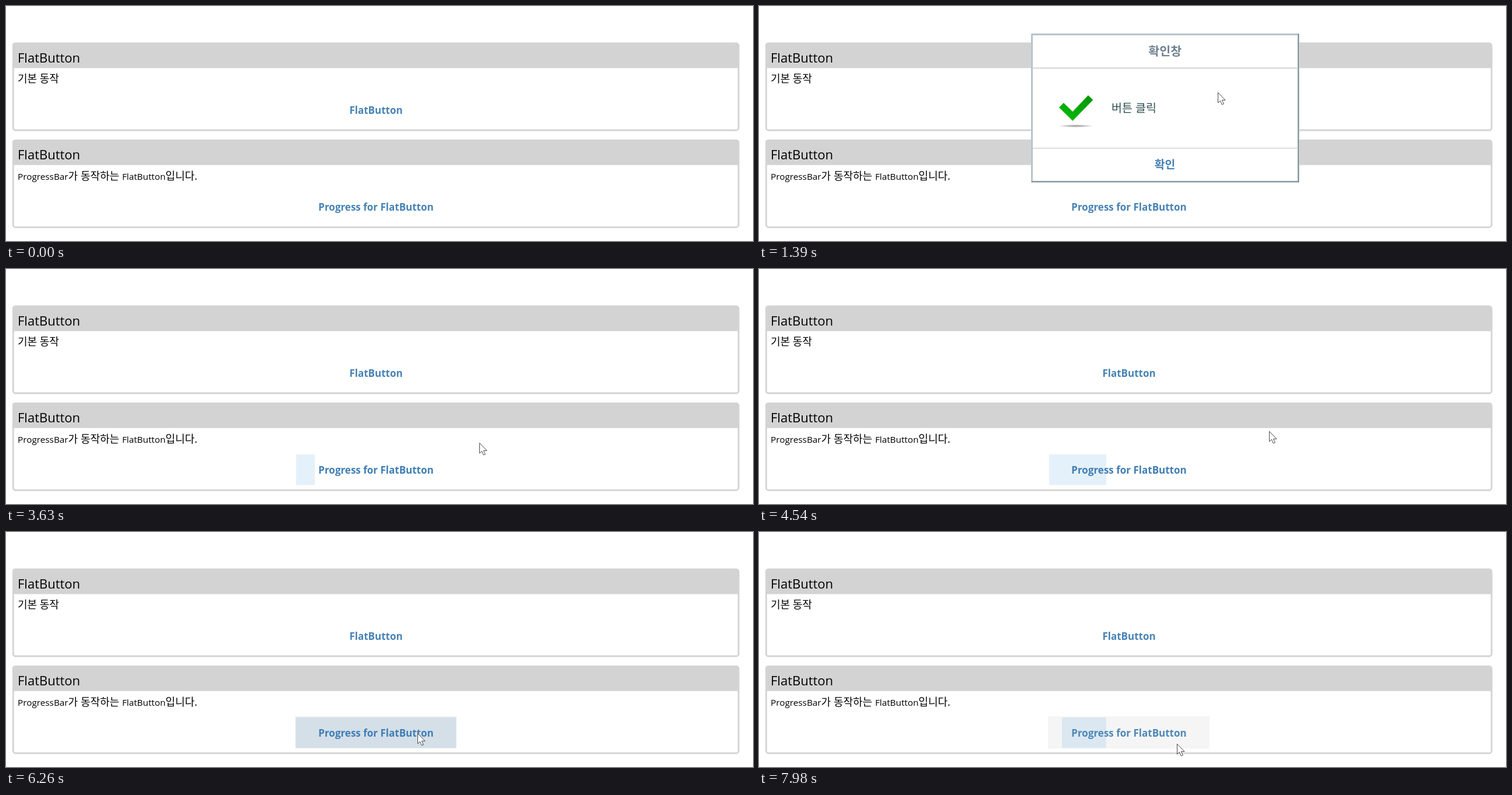
These frames come from a looping animation (1280 by 403 pixels, 8000 ms). An HTML page:

```html
<!DOCTYPE html>
<html lang="ko">
<head>
<meta charset="utf-8">
<title>FlatButton</title>
<style>
  html, body { margin: 0; width: 100%; height: 100%; overflow: hidden; background: #fff; }
  svg { display: block; width: 100%; height: 100%; }
  text { font-family: "Open Sans", "Noto Sans CJK KR", "Noto Sans CJK", sans-serif; white-space: pre; }
  .head { font-size: 22px; }
  .latin { font-size: 15.3px; word-spacing: .8px; }
  .hangul { font-size: 18px; }
  .label { font-size: 17px; font-weight: 700; fill: #4682b4; text-anchor: middle; }
  .title { font-size: 20.6px; font-weight: 700; fill: #708090; text-anchor: middle; }
  .message { font-size: 19.5px; fill: #2f4f4f; }
  .ok { font-size: 19.3px; font-weight: 700; fill: #4682b4; text-anchor: middle; }
  .hover { fill: #f5f5f5; }
</style>
</head>
<body>
<svg viewBox="0 0 1280 403" xmlns="http://www.w3.org/2000/svg">
  <defs>
    <linearGradient id="green" x1="0" y1="1" x2="1" y2="0">
      <stop offset="0" stop-color="#06bd06"/><stop offset="1" stop-color="#079407"/>
    </linearGradient>
    <radialGradient id="shade">
      <stop offset="0" stop-color="#999"/><stop offset=".5" stop-color="#c4c4c4"/>
      <stop offset="1" stop-color="#fff"/>
    </radialGradient>
    <g id="panel">
      <rect x="12.3" y="64" width="1243" height="149" rx="4" fill="#fff" stroke="#d3d3d3" stroke-width="2.8"/>
      <path d="M11 106.5V68q0-5 5-5H1251q5 0 5 5V106.5Z" fill="#d3d3d3"/>
      <text class="head" x="20" y="97">FlatButton</text>
    </g>
  </defs>

  <use href="#panel"/>
  <text class="hangul" x="20" y="131">기본 동작</text>
  <rect id="hover1" class="hover" x="495" y="150" width="277" height="55.5"/>
  <text class="label" x="634" y="185">FlatButton</text>

  <use href="#panel" y="166.3"/>
  <text class="latin" x="20" y="298">ProgressBar<tspan class="hangul">가</tspan> <tspan class="hangul">동작하는</tspan> FlatButton<tspan class="hangul">입니다.</tspan></text>
  <rect id="hover2" class="hover" x="495" y="316" width="277" height="55.5"/>
  <rect id="press" x="496.5" y="317.5" width="275" height="53" fill="#d5dfe8" stroke="#e6ebf0"/>
  <rect id="bar" y="318" height="52.5" fill="rgba(47,138,213,.12)"/>
  <text id="label2" class="label" x="634" y="351">Progress for FlatButton</text>

  <g id="dialog">
    <rect id="glow" x="466.5" y="47.5" width="459" height="255" fill="none" stroke="#cfdfea"/>
    <rect x="467" y="48" width="458" height="254" fill="#fff"/>
    <rect x="468.7" y="49.7" width="454" height="250.5" fill="none" stroke="#d3d3d3" stroke-width="1.4"/>
    <rect id="okHover" x="469" y="244" width="454" height="56" fill="#ebebeb"/>
    <path id="lightEdge" d="M467.5 302V48.5H925" fill="none" stroke-width="1.4"/>
    <path id="darkEdge" d="M924.4 48V301.4H467" fill="none" stroke-width="1.3"/>
    <path d="M469 106.6H923" stroke="#d3d3d3" stroke-width="2"/>
    <path d="M469 243.7H923" stroke="#d3d3d3" stroke-width="1.5"/>
    <text class="title" x="695.7" y="85">확인창</text>
    <ellipse cx="543" cy="205.7" rx="31" ry="2.6" fill="url(#shade)"/>
    <path d="M514 174L522 166L537.5 181L564 153L572.5 161L537.5 197Z" fill="url(#green)" stroke="#a5dba5" stroke-width=".8"/>
    <text id="message" class="message" x="604" y="182"></text>
    <text class="ok" x="695.5" y="279">확인</text>
  </g>

  <path id="cursor" d="M.5 .5V18L4.4 14.4L7.3 21L10.3 19.7L7.4 13.4H13Z" fill="#fff" stroke="#333" stroke-width=".9"/>
</svg>
<script>
  const LOOP = 8000, ENTER = 130;
  const $ = id => document.getElementById(id);
  const show = (id, on) => $(id).setAttribute('visibility', on ? 'inherit' : 'hidden');
  const within = (t, a, b) => t >= a && t < b;
  const progress = (t, a, b) => Math.min(1, Math.max(0, (t - a) / (b - a)));
  const easeOut = u => 1 - (1 - u) ** 2;

  // Pointer moves: start time, end time, destination; it rests in between
  const entry = { x: 940, y: 340 };
  const moves = [
    [ENTER, 750, 655, 158], [750, 930, 629, 178],     // first button
    [1140, 1390, 786, 148], [1470, 1930, 704, 276],   // dialog, then its button
    [2140, 2620, 667, 185], [2710, 3280, 690, 354],   // second button
    [3460, 3840, 864, 273], [3980, 4540, 874, 278],   // aside while the bar fills
    [4780, 5510, 744, 302], [5510, 5600, 744, 279],   // dialog button
    [5670, 5950, 705, 345],                           // back to the second button
    [6360, 6850, 717, 381], [7000, 7370, 702, 357], [7760, 7980, 716, 363]
  ];

  function pointer(t) {
    let { x, y } = entry;
    for (const [from, to, endX, endY] of moves) {
      const u = easeOut(progress(t, from, to));
      x += (endX - x) * u;
      y += (endY - y) * u;
    }
    return { x: Math.round(x), y: Math.round(y) };
  }

  function draw(t) {
    const { x, y } = pointer(t);
    const visible = t >= ENTER;
    const first = within(t, 1140, 2140);
    const second = within(t, 4780, 5700);
    const modal = first || second;
    const over = (top, bottom) => visible && within(x, 495, 772) && within(y, top, bottom);

    $('cursor').setAttribute('transform', `translate(${x} ${y})`);
    show('cursor', visible);

    const hover2 = !modal && over(316, 371);
    const pressed = within(t, 6260, 6360);
    show('hover1', !modal && over(150, 205));
    show('hover2', hover2);
    show('press', pressed);

    const running = within(t, 3460, 5700), again = t >= 7760;
    const left = again ? 519 : 497;
    const fill = again ? progress(t, 7760, 7980) : progress(t, 3460, 3980);
    $('bar').setAttribute('x', left);
    $('bar').setAttribute('width', (595 - left) * fill);
    show('bar', running || again);
    $('label2').style.fill = running || pressed ? '#3f7eb5' : hover2 ? '#4d87b7' : '#4682b4';

    show('dialog', modal);
    show('glow', first);
    show('okHover', modal && within(x, 469, 923) && within(y, 244, 300));
    $('lightEdge').setAttribute('stroke', first ? '#a3b4c1' : '#a6a6a6');
    $('darkEdge').setAttribute('stroke', first ? '#5b6f7e' : '#696969');
    $('message').textContent = first ? '버튼 클릭' : '완료';
  }

  const start = performance.now();
  function tick() {
    draw((performance.now() - start) % LOOP);
    requestAnimationFrame(tick);
  }
  tick();
</script>
</body>
</html>
```
